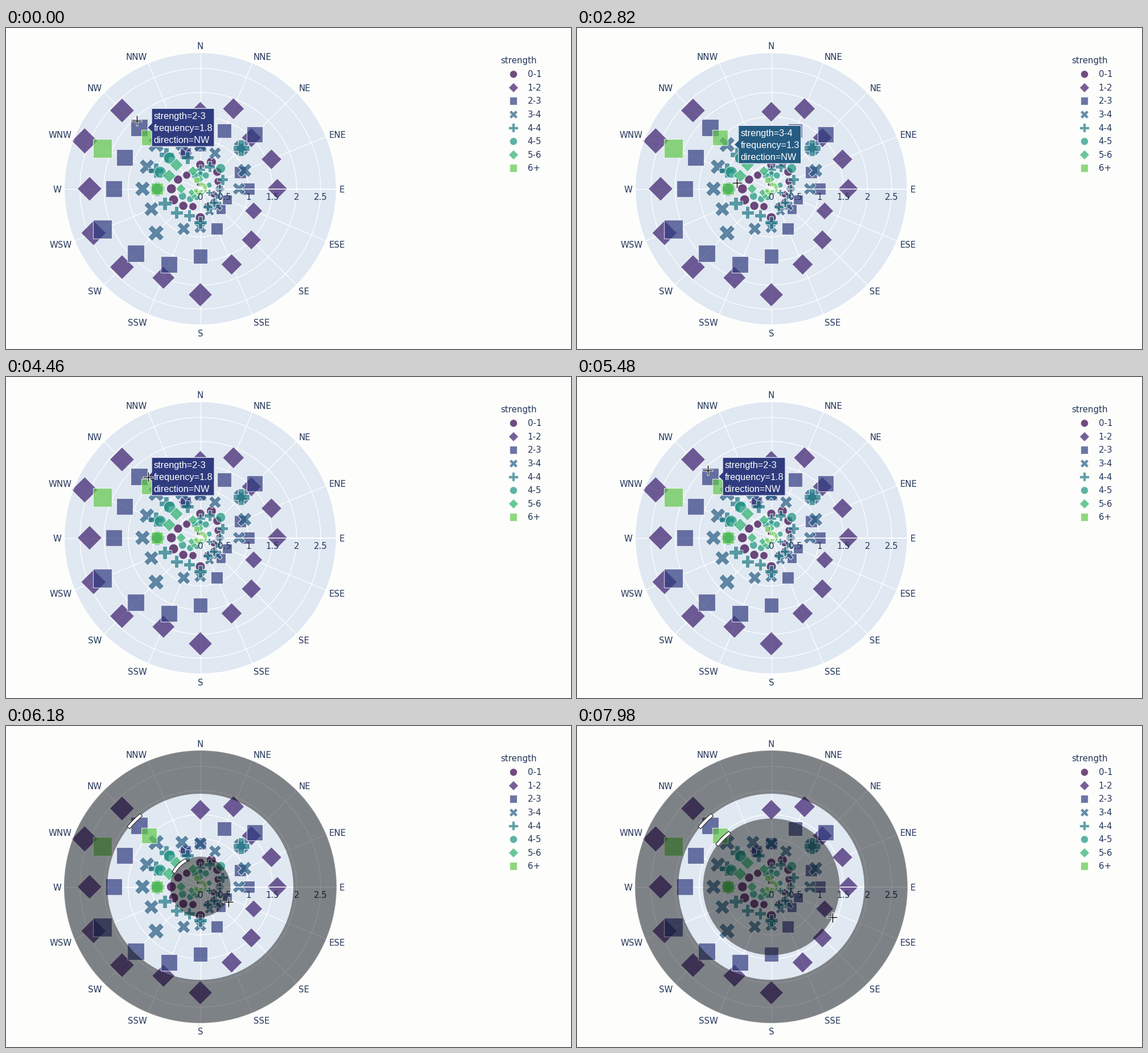
A matplotlib script that plays this animation: 993x564 px, repeating every 8000 ms.

```python
import numpy as np
import matplotlib.pyplot as plt
from matplotlib.animation import FuncAnimation
from matplotlib.collections import PolyCollection
from matplotlib.patches import Circle, Polygon, Wedge

W, H, DPI = 993, 564, 64
PT = 72 / DPI                     # points per pixel
CX, CY, UNIT, RIM = 341.5, 282.5, 84.6, 239
RMAX = 17.68                      # marker radius at frequency 2.6
STEP, FRAMES = 40, 200
INK = "#24365a"
PLOT_BG = "#e0e8f2"

DIRS = "N NNE NE ENE E ESE SE SSE S SSW SW WSW W WNW NW NNW".split()
NW = DIRS.index("NW")

# name, marker, colour, frequency in tenths for each direction
SERIES = [
    ("0-1", "circle", (52, 0, 70), "5 6 5 4 4 3 4 4 6 4 5 6 6 5 4 1"),
    ("1-2", "diamond", (58, 28, 108), "16 18 15 16 16 12 15 17 22 20 23 24 23 26 23 8"),
    ("2-3", "square", (47, 59, 126), "9 13 16 9 10 6 6 9 14 17 19 22 18 17 18 8"),
    ("3-4", "x", (37, 92, 130), "9 8 12 10 8 4 5 5 8 9 13 11 12 12 13 10"),
    ("4-4", "cross", (28, 118, 130), "4 5 12 5 4 2 4 4 7 6 7 8 9 10 10 7"),
    ("4-5", "circle", (26, 148, 126), "3 3 6 2 1 1 .5 1 1 2 3 4 9 9 9 3"),
    ("5-6", "diamond", (44, 176, 108), "2 1 1 1 1 1 .5 .5 1 .5 2 2 4 7 7 4"),
    ("6+", "square", (97, 199, 74), "1 1 1 1 1 .5 .5 .5 .5 1 1 1 9 22 15 2"),
]

# cursor path: time, x, y, inner radius of the zoom selection
PATH = np.array([
    (0, 229.5, 162.5, 163.5), (600, 229.5, 162.5, 163.5),
    (1300, 254.5, 195.5, 163.5), (1900, 254.5, 195.5, 163.5),
    (2820, 281.5, 272.5, 163.5), (3300, 281.5, 272.5, 163.5),
    (4460, 249.5, 175.5, 163.5), (5060, 229.5, 163.5, 163.5),
    (5500, 229.5, 163.5, 163.5), (5760, 353.5, 296.5, 17),
    (5860, 353.5, 296.5, 17), (6600, 457.5, 331.5, 117),
    (7980, 448.5, 336.5, 120),
])
DRAG, DIM, R0 = 5500, 5620, 163.5

fig = plt.figure(figsize=(W / DPI, H / DPI), dpi=DPI, facecolor="#fdfefc")
ax = fig.add_axes([0, 0, 1, 1])
ax.set_xlim(0, W)
ax.set_ylim(H, 0)
ax.axis("off")


def rgb(c):
    return tuple(v / 255 for v in c)


def polar(r, deg):
    a = np.radians(deg)
    return CX + r * np.cos(a), CY - r * np.sin(a)


def angle(k):
    return 90 - 22.5 * k


def size(freq):
    return RMAX * np.sqrt(freq / 2.6)


def shape(kind):
    """Outline of a marker with radius 1."""
    if kind == "circle":
        a = np.linspace(0, 2 * np.pi, 48, endpoint=False)
        return np.column_stack([np.cos(a), np.sin(a)])
    if kind == "square":
        return np.array([(-1, -1), (1, -1), (1, 1), (-1, 1)])
    if kind == "diamond":
        return 1.3 * np.array([(0, -1), (1, 0), (0, 1), (-1, 0)])
    arm = np.array([(.4, .4), (.4, 1.2), (-.4, 1.2)])
    turn = np.array([(0, 1), (-1, 0)])
    plus = np.vstack([arm @ np.linalg.matrix_power(turn, k) for k in range(4)])
    if kind == "x":
        plus = plus @ np.array([(1, 1), (-1, 1)]) / np.sqrt(2)
    return plus


def text(x, y, s, px=15, ha="center", color=INK, font="DejaVu Sans", z=6):
    """Text whose capitals are centred on y."""
    return ax.text(x, y + .365 * px, s, fontsize=px * PT, ha=ha, va="baseline",
                   color=color, family=font, zorder=z)


def line(x, y, color, px, z):
    return ax.plot(x, y, color=color, lw=px * PT, zorder=z,
                   solid_capstyle="butt")[0]


def markers(verts, color, z):
    ax.add_collection(PolyCollection(verts, facecolor=rgb(color), edgecolor="white",
                                     lw=1.25 * PT, alpha=.7, zorder=z))


# polar grid
ax.add_patch(Circle((CX, CY), RIM, fc=PLOT_BG, ec="none", zorder=1))
for k, name in enumerate(DIRS):
    line(*zip((CX, CY), polar(RIM, angle(k))), "white", 1.25, 2)
    c, s = np.cos(np.radians(angle(k))), np.sin(np.radians(angle(k)))
    ha = "center" if abs(c) < .01 else "left" if c > 0 else "right"
    text(CX + 244.2 * c, CY + 1.5 - 252.5 * s, name, ha=ha)
for k in range(1, 6):
    ax.add_patch(Circle((CX, CY), k * UNIT / 2, fc="none", ec="white",
                        lw=1.25 * PT, zorder=2))

# bubbles and legend
text(869, 56.5, "strength", ha="left")
for n, (name, kind, color, freqs) in enumerate(SERIES):
    outline = shape(kind)
    verts = []
    for k, f in enumerate(freqs.split()):
        f = float(f) / 10
        verts.append(outline * size(f) + polar(f * UNIT, angle(k)))
    markers(verts, color, 3 + n / 10)
    y = 80.8 + 23.6 * n
    markers([outline * 6.7 + (891.5, y)], color, 3)
    text(916.5, y, name, ha="left")

# axis lines and radial ticks lie over the bubbles
line((CX, CX + RIM), (CY, CY), "white", 1.5, 5)
ax.add_patch(Circle((CX, CY), RIM, fc="none", ec="white", lw=1.25 * PT, zorder=5))
for k in range(6):
    text(CX + k * UNIT / 2, 296.3, f"{k / 2:g}")

# zoom selection
outer = ax.add_patch(Wedge((CX, CY), RIM + .5, 0, 360, width=RIM + .5 - R0,
                           fc="black", ec="none", zorder=8))
inner = ax.add_patch(Circle((CX, CY), 1, fc="black", ec="none", zorder=8))
grips = [ax.add_patch(Polygon([(0, 0)] * 3, fc="white", ec="#333333",
                              lw=1.25 * PT, zorder=9)) for _ in range(2)]


def grip(r):
    if r == 0:
        return shape("circle") * 5 + (CX, CY)
    half = np.degrees(16 / r)
    a = np.linspace(135 - half, 135 + half, 16)
    return np.vstack([np.column_stack(polar(r + 3, a)),
                      np.column_stack(polar(r - 3, a[::-1]))])


# hover labels
class Hover:
    def __init__(self, index, fill, ink, edge):
        name, _, _, freqs = SERIES[index]
        f = float(freqs.split()[NW]) / 10
        self.point = x, y = polar(f * UNIT, angle(NW))
        tip = x + size(f)
        left, h = tip + 7.5, 33.4
        right = left + 110
        box = [(tip, y), (left, y - 7.5), (left, y - h), (right, y - h),
               (right, y + h), (left, y + h), (left, y + 7.5)]
        self.parts = [ax.add_patch(Polygon(box, fc=fill, ec=edge,
                                           lw=1.25 * PT, zorder=10))]
        rows = f"strength={name}", f"frequency={f:g}", "direction=NW"
        for k, row in enumerate(rows):
            self.parts.append(text(left + 3.75, y + 21.1 * (k - 1), row, 16.25, "left",
                                   ink, "Liberation Sans", 11))

    def distance(self, x, y):
        return np.hypot(x - self.point[0], y - self.point[1])

    def show(self, on):
        for p in self.parts:
            p.set_visible(on)


hovers = [Hover(2, "#2f3b7e", "white", "#e8ebf4"),
          Hover(7, "#61c74a", "#333b33", "#3c4a3c"),
          Hover(3, "#255c82", "white", "#e8ebf4")]

# crosshair cursor: white halo under a black cross
cursor = [(line([], [], c, w, z), line([], [], c, w, z), arm)
          for c, w, z, arm in (("white", 3.4, 12, 9.5), ("black", 1.4, 13, 8.5))]


def smooth(u):
    u = min(max(u, 0), 1)
    return u * u * (3 - 2 * u)


def pose(t):
    k = min(np.searchsorted(PATH[:, 0], t, side="right") - 1, len(PATH) - 2)
    a, b = PATH[k], PATH[k + 1]
    return (a + (b - a) * smooth((t - a[0]) / (b[0] - a[0])))[1:]


def update(i):
    t = i * STEP
    x, y, r = pose(t)
    for across, down, arm in cursor:
        across.set_data((x - arm, x + arm), (y, y))
        down.set_data((x, x), (y - arm, y + arm))

    nearest = min(hovers, key=lambda h: h.distance(x, y))
    for h in hovers:
        h.show(h is nearest and t < DRAG)

    r = r if r >= 20 else 0
    fade = smooth((t - DIM) / 200)
    for p in (outer, inner):
        p.set_alpha(.44 * fade)
        p.set_visible(fade > 0)
    inner.set_radius(r)
    for g, radius in zip(grips, (R0, r)):
        g.set_xy(grip(radius))
        g.set_alpha(fade)
        g.set_visible(fade > 0)
    return []


anim = FuncAnimation(fig, update, frames=FRAMES, interval=STEP,
                     repeat=True, repeat_delay=0, blit=False)
plt.show()
```
